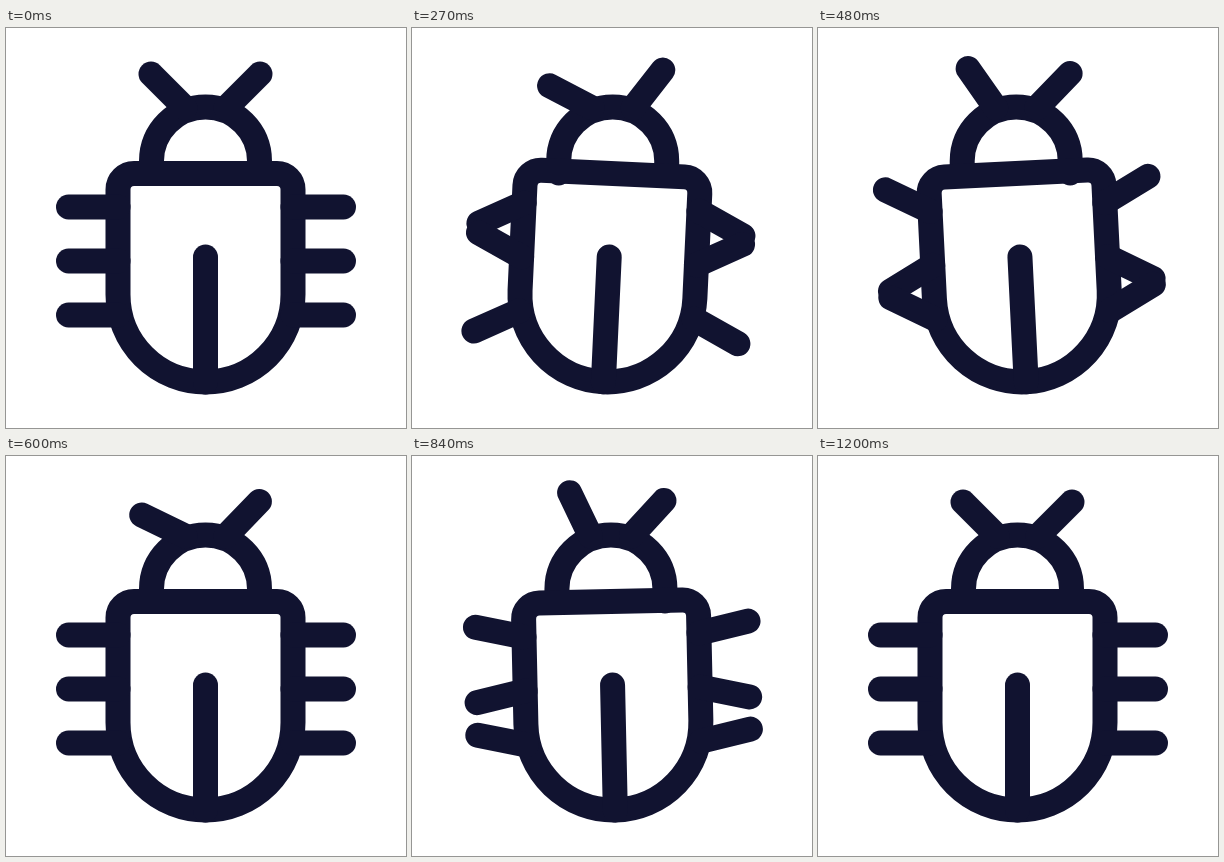
Recreate the animation shown at these times as an HTML page. Size 400x400 px, loop 3.23 s.

```html
<!DOCTYPE html>
<html>
<head>
<meta charset="utf-8">
<style>
  html, body { margin: 0; width: 100%; height: 100%; overflow: hidden; background: #fff; }
  svg { display: block; width: 100vw; height: 100vh; }
</style>
</head>
<body>
<svg viewBox="0 0 400 400" fill="none" stroke="#111330" stroke-width="25" stroke-linecap="round">
  <g id="head">
    <path d="M145.5 145V133a54 54 0 0 1 108 0V145"/>
    <path id="left" d="M145 46L179 80"/>
    <path id="right" d="M254 46L220 80"/>
  </g>
  <g id="body">
    <path d="M128 145.5H271a16 16 0 0 1 16 16V266.500a87.500 87.500 0 0 1-175 0V161.500a16 16 0 0 1 16-16Z"/>
    <path d="M199.500 229V354"/>
  </g>
</svg>
<script>
const LOOP = 3230, STEP = 30, ACTIVE = 1200;
const get = id => document.getElementById(id);
const head = get('head'), body = get('body'), left = get('left'), right = get('right');

// Swing extremes as [ms, degrees]
const sway = [[0, 0], [100, -3], [300, 3], [500, -3], [700, 3], [920, -3], [1130, 3], [1200, 0]];
const leftSwing = [[0, 0], [90, 9.5], [270, -17.4], [410, 20], [620, -20], [860, 20], [1060, -10], [1200, 0]];
const rightSwing = [[0, 0], [70, -22], [190, 20], [325, -22], [430, 20], [530, -22], [670, 20],
  [785, -22], [900, 20], [1010, -8], [1200, 0]];

// Cosine easing between neighbouring extremes
function swing(keys, t) {
  const i = keys.findIndex(k => k[0] > t);
  if (i < 0) return 0;
  const [t0, a] = keys[i - 1], [t1, b] = keys[i];
  return a + (b - a) * (1 - Math.cos(Math.PI * (t - t0) / (t1 - t0))) / 2;
}

const turn = (el, angle, x, y) => el.setAttribute('transform', `rotate(${angle} ${x} ${y})`);

const legs = [];
[179, 233, 287].forEach((y, row) => {
  for (const [tip, hip, side] of [[62.5, 112, 1], [337.5, 287, -1]]) {
    const el = document.createElementNS('http://www.w3.org/2000/svg', 'path');
    el.setAttribute('d', `M${tip} ${y}H${hip}`);
    body.append(el);
    legs.push({ el, hip, y, dir: row === 1 ? side : -side });
  }
});

function draw(now) {
  const t = Math.min(Math.floor(now % LOOP / STEP) * STEP, ACTIVE);
  const tilt = swing(sway, t);
  turn(body, tilt, 199.5, 180);
  for (const { el, hip, y, dir } of legs) turn(el, dir * tilt * 10, hip, y);
  head.setAttribute('transform', `translate(${tilt * 0.45} 0)`);
  turn(left, swing(leftSwing, t), 179, 80);
  turn(right, swing(rightSwing, t), 220, 80);
}

const start = performance.now();
function tick() {
  draw(performance.now() - start);
  requestAnimationFrame(tick);
}
tick();
</script>
</body>
</html>
```
